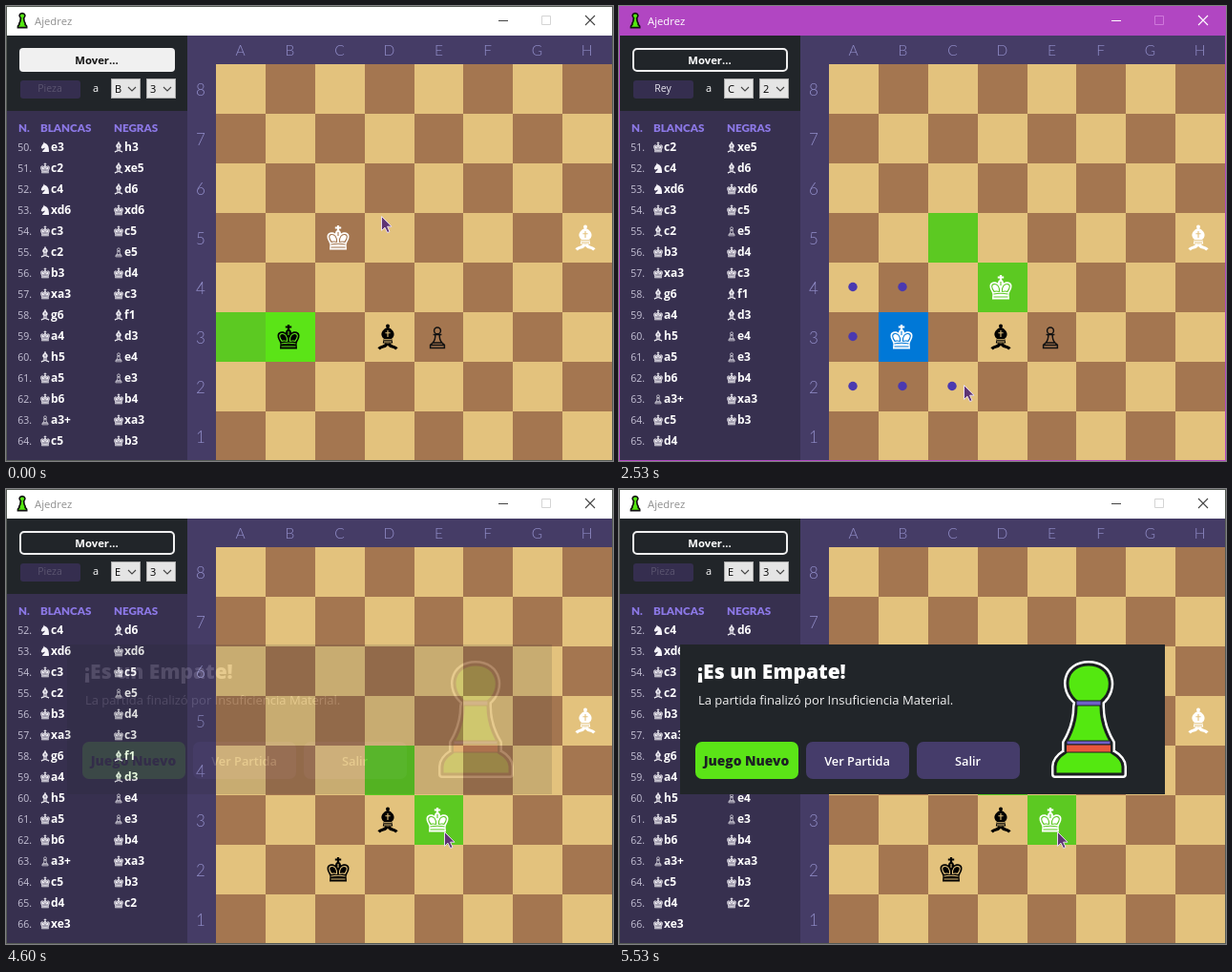
These frames come from a looping animation (636 px wide and 477 px high, 6740 ms). An HTML page:

```html
<!DOCTYPE html>
<html lang="es">
<head>
<meta charset="utf-8">
<title>Ajedrez</title>
<style>
html, body { margin: 0; width: 100%; height: 100%; overflow: hidden; background: #453c66; }
svg { display: block; width: 636px; height: 477px; }
text { font-family: "Open Sans", "Noto Sans", sans-serif; white-space: pre; }
.geo { font-family: Lato, "Open Sans", sans-serif; }
</style>
</head>
<body>
<svg viewBox="0 0 636 477" xmlns="http://www.w3.org/2000/svg">
  <defs>
    <mask id="kingCut" maskUnits="userSpaceOnUse" x="-15" y="-15" width="30" height="30">
      <rect x="-15" y="-15" width="30" height="30" fill="#fff"/>
      <g fill="none" stroke="#000" stroke-width="1.1">
        <path d="M-1.4 4.6C-1-1-4-4-7-3.5C-10.2-3-10 0-7 4.4Q-4 3.6-1.4 4.6"/>
        <path d="M1.4 4.6C1-1 4-4 7-3.5C10.2-3 10 0 7 4.4Q4 3.6 1.4 4.6"/>
        <path d="M0-6V-2M-7.5 7Q0 5.4 7.5 7M-7.5 10H7.5"/>
      </g>
    </mask>
    <mask id="bishopCut" maskUnits="userSpaceOnUse" x="-15" y="-15" width="30" height="30">
      <rect x="-15" y="-15" width="30" height="30" fill="#fff"/>
      <path d="M0-7V0M-2.6-4.2H2.6M-4.2 2.8H4.2M-4 5H4" stroke="#000" stroke-width="1.1"/>
    </mask>
    <g id="K" mask="url(#kingCut)" fill="currentColor">
      <path d="M-1.1-13H1.1V-11.6H3.2V-9.6H1.1V-7H-1.1V-9.6H-3.2V-11.6H-1.1Z"/>
      <path d="M-8.6 7C-9.6 3.5-11.8 1.5-11.5-2C-11-6-6-6.8-3-4.4C-3-7-1.5-8 0-8C1.5-8 3-7 3-4.4C6-6.8 11-6 11.5-2C11.8 1.5 9.6 3.5 8.6 7L9 12.6H-9Z"/>
    </g>
    <g id="B" mask="url(#bishopCut)" fill="currentColor">
      <circle cy="-11.6" r="2"/>
      <path d="M0-10.6C4.6-8.4 7.4-5 6.4-1.6Q5.8.6 4.2 1.6L5.2 6.6H-5.2L-4.2 1.6Q-5.8.6-6.4-1.6C-7.4-5-4.6-8.4 0-10.6Z"/>
      <path d="M-1 6.6C-2 11.4-6.2 8.6-9.4 12.4M1 6.6C2 11.4 6.2 8.6 9.4 12.4" fill="none" stroke="currentColor" stroke-width="3.2"/>
    </g>
    <g id="P" fill="none" stroke="currentColor" stroke-width="1.5">
      <circle cy="-6.6" r="3.4"/>
      <path d="M-4.4-2.4H4.4M-2.2-2.4Q-2 3-4.8 6H4.8Q2 3 2.2-2.4M-4.8 6L-7.4 8.4V11.6H7.4V8.4L4.8 6M-7 8.6H7"/>
    </g>
    <path id="N" fill="currentColor" d="M-7 12H9.5C10 2 8-8-1-10L-3-13L-4.4-9C-7-6-10-1-10 2L-7 4.4L-1 1C0 5-7 7-7 12Z"/>
    <path id="pawn" d="M480 223C463 210 468 184 492 184C516 184 521 210 505 223V228C505 245 510 256 516 266V276Q528 283 528 291V299H457V291Q457 283 468 276V266C474 256 479 245 479 228Z"/>
  </defs>
  <g id="scene"></g>
</svg>
<script>
const LOOP = 6740, FPS = 15;
const scene = document.getElementById("scene");
const moves = ("Ne3 Bh3,Kc2 Bxe5,Nc4 Bd6,Nxd6 Kxd6,Kc3 Kc5,Bc2 Pe5,Kb3 Kd4,Kxa3 Kc3,Bg6 Bf1," +
  "Ka4 Bd3,Bh5 Pe4,Ka5 Pe3,Kb6 Kb4,Pa3+ Kxa3,Kc5 Kb3,Kd4 Kc2,Kxe3").split(",").map(m => m.split(" "));

// start of each position, half-moves played since move 50, pieces and marked squares
const positions = [
  { at: 0, plies: 30, white: "C5", black: "B3", marked: ["A3", "B3"] },
  { at: 1060, plies: 31, white: "D4", black: "B3", marked: ["C5", "D4"] },
  { at: 2590, plies: 32, white: "D4", black: "C2", marked: ["B3", "C2"] },
  { at: 4260, plies: 33, white: "E3", black: "C2", marked: ["D4", "E3"] }
];
const picks = [
  { from: 395, to: 1060, square: "C5", dots: "B6 C6 D6 D5 D4" },
  { from: 1990, to: 2590, square: "B3", dots: "A4 B4 A3 A2 B2 C2" },
  { from: 3660, to: 4260, square: "D4", dots: "C5 D5 E5" }
];
const targets = [[0, "B3"], [660, "D4"], [2320, "C2"], [3990, "E3"]];
const FOCUS_ON = 395, FOCUS_OFF = 4520, FADE_AT = 4545, FADE_MS = 985;

const cursorPath = [
  [0, 393, 220], [67, 393, 220], [400, 350, 245], [467, 350, 245], [733, 379, 291], [933, 391, 301],
  [1200, 391, 301], [1533, 330, 347], [1867, 308, 344], [2000, 308, 344], [2467, 361, 397],
  [2667, 361, 397], [3200, 416, 297], [3333, 412, 298], [3667, 412, 298], [4133, 459, 359], [LOOP, 459, 359]
];

const slope = (i, k) => {
  const a = cursorPath[i], b = cursorPath[i + 1];
  return a && b ? (b[k] - a[k]) / (b[0] - a[0]) : 0;
};
const tangent = (i, k) => {
  const a = slope(i - 1, k), b = slope(i, k);
  return a * b > 0 ? 2 * a * b / (a + b) : 0;
};
// monotone cubic through the cursor stops
function cursorAt(t) {
  let i = 0;
  while (i < cursorPath.length - 2 && cursorPath[i + 1][0] <= t) i++;
  const a = cursorPath[i], b = cursorPath[i + 1], h = b[0] - a[0], u = (t - a[0]) / h;
  const s = u * u * (3 - 2 * u);
  return [1, 2].map(k => a[k] + (b[k] - a[k]) * s +
    h * u * (1 - u) * ((1 - u) * tangent(i, k) - u * tangent(i + 1, k)));
}

const rect = (x, y, w, h, fill, more = "") => `<rect x="${x}" y="${y}" width="${w}" height="${h}" fill="${fill}" ${more}/>`;
const line = (d, stroke, w = 1) => `<path d="${d}" fill="none" stroke="${stroke}" stroke-width="${w}"/>`;
const text = (x, y, s, size, fill, weight = 400, anchor = "start", cls = "") =>
  `<text x="${x}" y="${y}" font-size="${size}" fill="${fill}" font-weight="${weight}" text-anchor="${anchor}" class="${cls}">${s}</text>`;
const glyph = (id, x, y, color, k = 1) => `<use href="#${id}" color="${color}" transform="translate(${x} ${y}) scale(${k})"/>`;

const edgeX = i => Math.round(220 + 51.875 * i);
const edgeY = i => Math.min(61 + 52 * i, 476);
const colOf = sq => sq.charCodeAt(0) - 65;
const rowOf = sq => 8 - sq[1];
const isLight = sq => (colOf(sq) + rowOf(sq)) % 2 === 0;
const midX = sq => edgeX(colOf(sq)) + 24;
const midY = sq => edgeY(rowOf(sq)) + 26;
const fillSquare = (sq, fill) => {
  const x = edgeX(colOf(sq)), y = edgeY(rowOf(sq));
  return rect(x, y, edgeX(colOf(sq) + 1) - x, edgeY(rowOf(sq) + 1) - y, fill);
};
const piece = (id, sq, color) => glyph(id, midX(sq), midY(sq), color);

function titleBar(focused) {
  const ink = focused ? "#fff" : "#444";
  return rect(0, 0, 636, 31, focused ? "#b146c2" : "#fff") +
    `<use href="#pawn" transform="translate(17 15) scale(.13) translate(-492 -241)" fill="#54e810" stroke="#111" stroke-width="13"/>` +
    text(30, 20, "Ajedrez", 11.3, focused ? "#fff" : "#8f8f8f") +
    line("M516 15.5H526", ink) +
    line("M561.5 10.5H570.5V19.5H561.5Z", focused ? "#cf78db" : "#d4d4d4") +
    line("M607 10L617 20M617 10L607 20", ink, 1.1);
}

function combo(x, value) {
  return rect(x + .5, 76.5, 30, 20, "#e5e5e5", 'stroke="#adadad"') +
    text(x + 4, 91, value, 11, "#000") +
    line(`M${x + 18} 85L${x + 22} 89L${x + 26} 85`, "#444", 1.1);
}

function controls(whiteTurn, picked, target) {
  const button = whiteTurn
    ? rect(14, 44, 163, 25, "#f0f0f0", 'rx="4"')
    : rect(15, 45, 161, 23, "#212529", 'rx="4" stroke="#f0f0f0" stroke-width="2"');
  return rect(0, 31, 190, 79, "#212529") + button +
    text(95, 61, "Mover...", 11.3, whiteTurn ? "#111" : "#fff", 700, "middle") +
    rect(15, 78, 63, 19, "#352e4f", 'rx="3"') +
    text(46, 90, picked ? "Rey" : "Pieza", 10.5, picked ? "#e8e6f0" : "#5b5570", 400, "middle") +
    text(94, 90, "a", 11, "#fff", 400, "middle") +
    combo(110, target[0]) + combo(147, target[1]);
}

function moveList(plies) {
  const last = Math.ceil(plies / 2), first = last - 15;
  let out = rect(0, 110, 190, 367, "#37304f");
  [[13, "N."], [36, "BLANCAS"], [113, "NEGRAS"]].forEach(([x, s]) => {
    out += text(x, 132, s, 11.6, "#8c78e6", 900, "start", "geo");
  });
  for (let i = first; i < last; i++) {
    const y = 148 + 22 * (i - first);
    out += text(27, y + 4, `${50 + i}.`, 10.5, "#c6c2d6", 400, "end");
    moves[i].forEach((m, side) => {
      if (i * 2 + side >= plies) return;
      const x = side ? 113 : 36;
      out += glyph(m[0], x + 5, y, "#f4f2f8", .42) + text(x + 11, y + 4, m.slice(1), 12, "#fff", 700);
    });
  }
  return out;
}

function board(pos, pick) {
  let out = rect(190, 31, 446, 446, "#453c66");
  for (let r = 0; r < 8; r++) {
    for (let c = 0; c < 8; c++) {
      const sq = "ABCDEFGH"[c] + (8 - r);
      out += fillSquare(sq, isLight(sq) ? "#e3c27d" : "#a47650");
    }
    out += text(edgeX(r) + 25.5, 52, "ABCDEFGH"[r], 15.5, "#918dc8", 300, "middle", "geo");
    out += text(204, edgeY(r) + 33, 8 - r, 17, "#918dc8", 300, "middle", "geo");
  }
  pos.marked.forEach(sq => { out += fillSquare(sq, isLight(sq) ? "#5be417" : "#5cc922"); });
  if (pick) {
    out += fillSquare(pick.square, "#0078d7");
    pick.dots.split(" ").forEach(sq => {
      out += `<circle cx="${midX(sq) + 1}" cy="${midY(sq) - .5}" r="4.7" fill="#4a39b0"/>`;
    });
  }
  if (pos.white !== "E3") out += piece("P", "E3", "#111");
  return out + piece("B", "D3", "#000") + piece("B", "H5", "#fff") + piece("K", pos.white, "#fff") +
    piece("K", pos.black, pick && pick.square === pos.black ? "#fff" : "#000");
}

function dialog(alpha) {
  if (alpha <= 0) return "";
  const button = (x, label, fill, ink, size, weight) =>
    rect(x, 265, 108, 39, fill, 'rx="7"') + text(x + 53.5, 290, label, size, ink, weight, "middle");
  return `<g opacity="${alpha.toFixed(3)}">` + rect(64, 163, 508, 157, "#212529") +
    text(82, 199, "¡Es un Empate!", 21, "#fff", 800) +
    text(83, 226, "La partida finalizó por Insuficiencia Material.", 13, "#f2f2f2") +
    button(80, "Juego Nuevo", "#5be417", "#1c2024", 13.8, 800) +
    button(196, "Ver Partida", "#453c6a", "#fff", 12.8, 600) +
    button(312, "Salir", "#453c6a", "#fff", 12.8, 600) +
    `<use href="#pawn" fill="#fff" stroke="#fff" stroke-width="8" stroke-linejoin="round"/>` +
    `<use href="#pawn" fill="#54e810" stroke="#1b1e20" stroke-width="3" stroke-linejoin="round"/>` +
    rect(479, 222, 26, 5, "#6f60c8", 'stroke="#1b1e20"') +
    rect(469, 264, 46, 4, "#6f60c8", 'stroke="#1b1e20"') +
    rect(468.5, 268, 47, 8, "#e8563c", 'stroke="#1b1e20"') + "</g>";
}

function cursor(t) {
  const [x, y] = cursorAt(t).map(Math.round);
  return `<path transform="translate(${x} ${y})" d="M.5.5V15.5L4 12.2L6.6 17.6L9 16.6L6.6 11.2H11Z" fill="#5e3474" stroke="#e9deef"/>`;
}

function draw(t) {
  const pos = positions.filter(p => t >= p.at).pop();
  const pick = picks.find(p => t >= p.from && t < p.to);
  const target = targets.filter(p => t >= p[0]).pop()[1];
  const focused = t >= FOCUS_ON && t < FOCUS_OFF;
  const fade = Math.min(Math.max((t - FADE_AT) / FADE_MS, 0), 1);
  scene.innerHTML = titleBar(focused) + controls(pos.plies % 2 === 0, pick, target) +
    moveList(pos.plies) + board(pos, pick) +
    rect(.5, .5, 635, 476, "none", `stroke="${focused ? "#b146c2" : "#555a55"}"`) +
    dialog(1 - Math.pow(1 - fade, 2.5)) + cursor(t);
}

let shown = -1;
function tick() {
  const step = Math.floor(performance.now() % LOOP * FPS / 1000 + .1);
  if (step !== shown) {
    shown = step;
    draw(step * 1000 / FPS);
  }
  requestAnimationFrame(tick);
}
tick();
</script>
</body>
</html>
```
